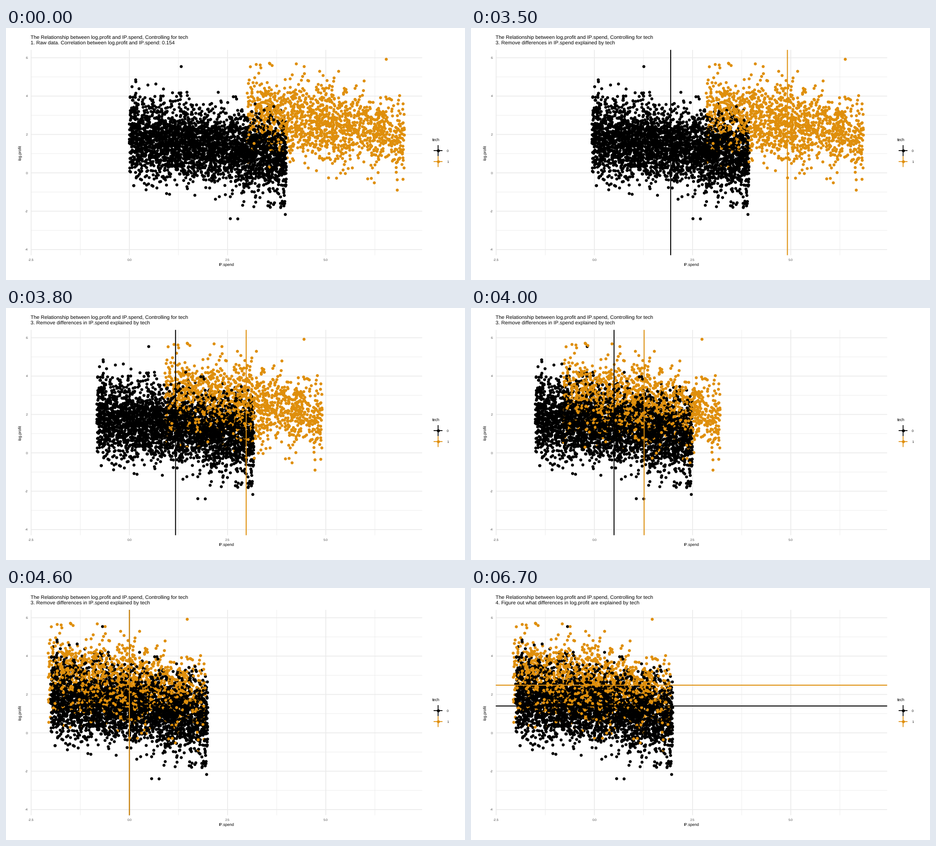
A matplotlib script for the animation above (8 s loop, 1009 by 555 pixels).

```python
import matplotlib.pyplot as plt
import numpy as np
from matplotlib.animation import FuncAnimation

W, H, DPI = 1009, 555, 64
PT = 72 / DPI                      # points per pixel
STEP = 100                         # ms per frame
LEFT, RIGHT, TOP, BOTTOM = 54.5, 914.8, 48.2, 500.4
X0, Y0, X_UNIT, Y_UNIT = 271.2, 319.0, 86.35, 42.25
GRID, TICK = "#ebebeb", "#4d4d4d"
COLORS = ("#000000", "#df8f0c")
MEAN_X, MEAN_Y = (2.003, 5.067), (1.40, 2.485)
COUNTS = (3450, 1450)
DOT = (6.6 * PT) ** 2

HEADING = "The Relationship between log.profit and IP.spend, Controlling for tech"
STAGES = (
    (0, "1. Raw data. Correlation between log.profit and IP.spend: 0.154"),
    (500, "2. Figure out what differences in IP.spend are explained by tech"),
    (3500, "3. Remove differences in IP.spend explained by tech"),
    (6400, "4. Figure out what differences in log.profit are explained by tech"),
)

# Most distant outliers of each group: (IP.spend, log.profit)
OUTLIERS = (
    [(1.32, 5.54), (2.57, -2.39), (2.76, -2.4), (3.97, -2.17)],
    [(3.23, 5.65), (3.58, 5.68), (4.25, 5.68), (4.45, 5.54), (6.54, 5.92), (6.82, -0.9)],
)

plt.rcParams["font.family"] = "Liberation Sans"
plt.rcParams["text.hinting"] = "none"
plt.rcParams["text.kerning_factor"] = 6    # unkerned text


def px(x):
    return X0 + X_UNIT * x


def py(y):
    return Y0 - Y_UNIT * y


def make_group(rng, tech):
    """log.profit = 2 + 2 tech - 0.3 IP.spend + noise."""
    count = COUNTS[tech]
    spend = 3 * tech + rng.uniform(0, 4, count)
    noise = rng.normal(0, 1, 2 * count)
    noise = noise[np.abs(noise) < 2.9][:count]
    profit = 2 + 2 * tech - 0.3 * spend + noise
    return np.vstack([np.column_stack([spend, profit]), OUTLIERS[tech]])


def make_data():
    rng = np.random.default_rng(12)
    groups = [make_group(rng, tech) for tech in (0, 1)]
    tech = np.repeat([0, 1], [len(g) for g in groups])
    order = rng.permutation(len(tech))
    spend, profit = np.vstack(groups)[order].T
    return spend, profit, tech[order]


def line(xs, ys, color, width, z):
    return ax.plot(xs, ys, color=color, lw=width * PT, zorder=z,
                   solid_capstyle="butt", snap=False)[0]


def v_rule(x, color, width, z):
    return line([px(x)] * 2, [TOP, BOTTOM], color, width, z)


def h_rule(y, color, width, z):
    return line([LEFT, RIGHT], [py(y)] * 2, color, width, z)


def label(x, y, text, size, color="black", **kw):
    return ax.text(x, y, text, fontsize=size * PT, color=color, **kw)


def draw_grid():
    for x in np.arange(-1.25, 7, 2.5):
        v_rule(x, GRID, 0.9, 1)
    for y in range(-3, 6, 2):
        h_rule(y, GRID, 0.9, 1)
    for x in np.arange(-2.5, 6, 2.5):
        v_rule(x, GRID, 1.8, 1)
        label(px(x), 512.5, f"{x:.1f}", 7.1, TICK, ha="center")
    for y in range(-4, 7, 2):
        h_rule(y, GRID, 1.8, 1)
        label(47.6, py(y) + 2.5, str(y), 7.1, TICK, ha="right")


def draw_labels():
    label(54.5, 24.3, HEADING, 11.2)
    label(484.7, 524, "IP.spend", 8.6, ha="center")
    label(31.5, 274.3, "log.profit", 8.6, rotation=90, ha="center", va="center")


def draw_legend():
    label(937, 249.3, "tech", 8.7)
    for i, color in enumerate(COLORS):
        y = 270 + 24.2 * i
        line([940, 959.5], [y, y], color, 1.8, 3)
        line([949.8] * 2, [y - 12, y + 12], color, 1.8, 3)
        ax.scatter([949.8], [y], s=DOT, c=color, lw=0, zorder=4)
        label(969, y + 2.6, str(i), 7.1)


fig = plt.figure(figsize=(W / DPI, H / DPI), dpi=DPI, facecolor="white")
ax = fig.add_axes([0, 0, 1, 1])
ax.set(xlim=(0, W), ylim=(H, 0))
ax.axis("off")
ax.set_autoscale_on(False)

draw_grid()
draw_labels()
draw_legend()

spend, profit, tech = make_data()
group_mean = np.array(MEAN_X)[tech]
dots = ax.scatter(px(spend), py(profit), s=DOT, lw=0, zorder=5,
                  c=np.array(COLORS)[tech])
subtitle = label(54.5, 36.5, "", 11.2)
v_lines = [v_rule(x, color, 2.1, 6) for x, color in zip(MEAN_X, COLORS)]
h_lines = [h_rule(y, color, 2.1, 6) for y, color in zip(MEAN_Y, COLORS)]


def update(frame):
    t = frame * STEP
    subtitle.set_text([text for start, text in STAGES if t >= start][-1])

    progress = np.clip((t - 3400) / 900, 0, 1)
    eased = (1 - np.cos(np.pi * progress)) / 2
    dots.set_offsets(np.column_stack([px(spend - eased * group_mean), py(profit)]))

    for mean, v_line in zip(MEAN_X, v_lines):
        v_line.set_xdata([px(mean * (1 - eased))] * 2)
        v_line.set_visible(800 <= t < 6400)
    for h_line in h_lines:
        h_line.set_visible(t >= 6700)
    return [dots, subtitle, *v_lines, *h_lines]


anim = FuncAnimation(fig, update, frames=80, interval=STEP, repeat=True,
                     repeat_delay=0, blit=False)
plt.show()
```
